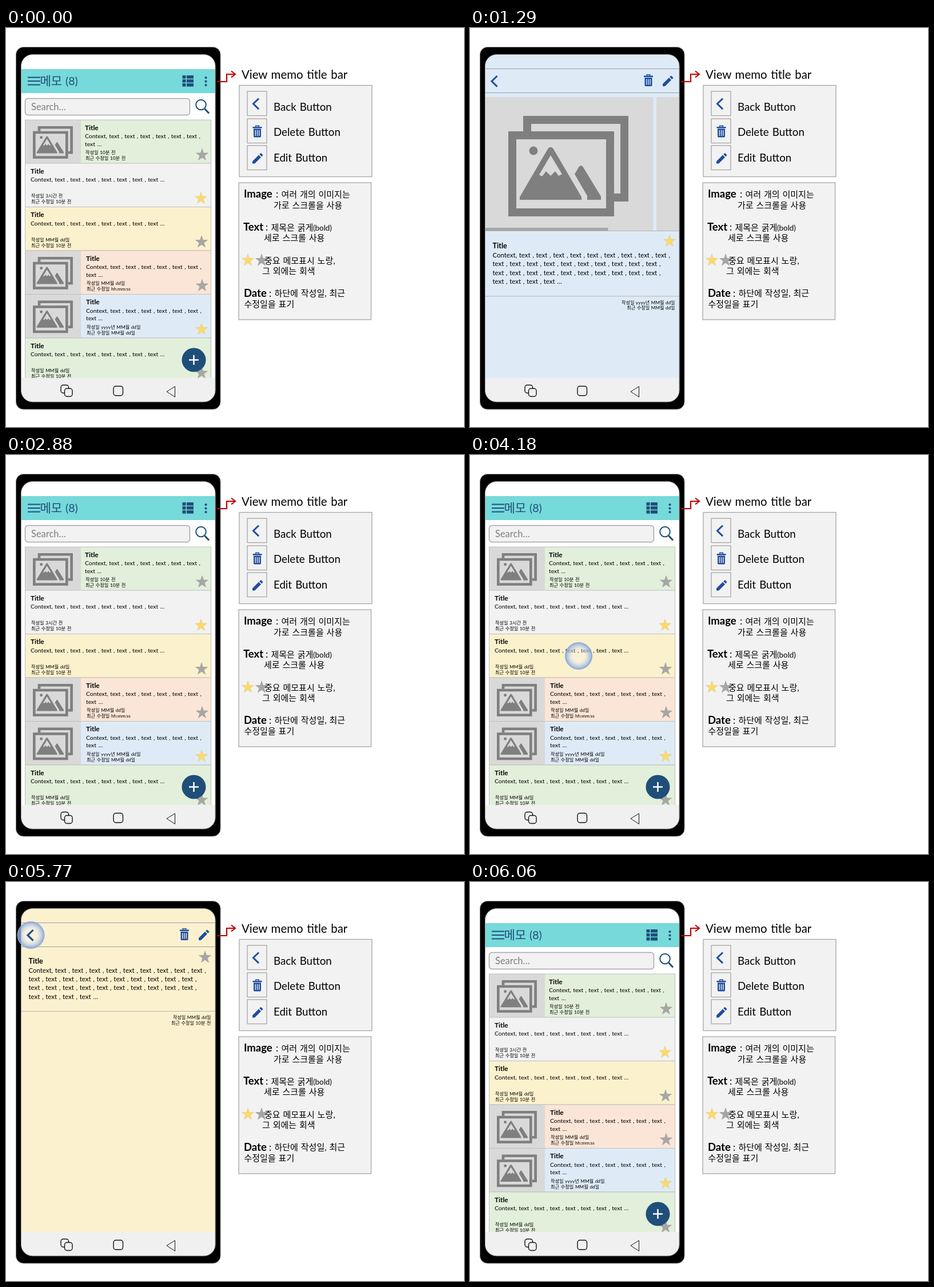
An HTML page that plays this animation: 801x699 px, repeating every 6140 ms.

```html
<!DOCTYPE html>
<html lang="ko">
<head>
<meta charset="utf-8">
<title>Memo app wireframe</title>
<style>
  html, body { margin: 0; width: 100%; height: 100%; overflow: hidden; background: #fff; }
  svg { display: block; width: 801px; height: 699px; }
  text { font-family: Lato, "Noto Sans CJK KR", "Noto Sans CJK", sans-serif; word-spacing: .07em; white-space: pre; }
  .line { fill: none; stroke: #a6a6a6; }
  .ink { fill: #1f4e79; }
  .ink-line { fill: none; stroke: #1f4e79; }
  .blue { fill: #1f4e9f; fill-rule: evenodd; }
  .panel { fill: #f2f2f2; stroke: #a6a6a6; stroke-width: 1.3; }
  .nav { fill: #f0f0f0; stroke: #111; stroke-width: 1.4; }
</style>
</head>
<body>
<svg id="stage" viewBox="0 0 801 699"></svg>
<script>
const LOOP = 6140;
const GREY = '#a6a6a6', GOLD = '#ffd966';

const text = (x, y, size, str, extra = '') =>
  `<text x="${x}" y="${y}" font-size="${size}" ${extra}>${str}</text>`;
const bold = (x, y, size, str) => text(x, y, size, str, 'font-weight="700"');
const rect = (x, y, w, h, attrs) =>
  `<rect x="${x}" y="${y}" width="${w}" height="${h}" ${attrs}/>`;
const rule = (y, color = '#9aa0a6') =>
  `<path d="M27 ${y}H366" stroke="${color}"/>`;
const use = (id, x, y, scale = '1') =>
  `<use href="#${id}" transform="translate(${x} ${y}) scale(${scale})"/>`;

function star(x, y, color) {
  const points = Array.from({ length: 10 }, (_, i) => {
    const r = i % 2 ? 4.3 : 11, a = (i / 5 - .5) * Math.PI;
    return `${(x + r * Math.cos(a)).toFixed(2)},${(y + r * Math.sin(a)).toFixed(2)}`;
  });
  const edge = color === GOLD ? '#d9c98c' : '#999';
  return `<polygon points="${points.join(' ')}" fill="${color}" stroke="${edge}" stroke-width=".6"/>`;
}

const press = (id, x, y, icon = '') =>
  `<g id="${id}"><circle cx="${x}" cy="${y}" r="23.5" fill="url(#glow)" stroke="#8faadc"/>${icon}</g>`;

const words = n => Array(n).fill('text').join(' , ');

const defs = `<defs>
  <radialGradient id="glow">
    <stop offset="0" stop-color="#fff" stop-opacity="0"/>
    <stop offset=".42" stop-color="#eef3fb" stop-opacity=".3"/>
    <stop offset=".75" stop-color="#b4c7e7" stop-opacity=".7"/>
    <stop offset="1" stop-color="#7f9fd8" stop-opacity=".9"/>
  </radialGradient>
  <clipPath id="screen">${rect(26.5, 46.5, 339.5, 608.5, 'rx="20"')}</clipPath>
  <clipPath id="page">${rect(26, 46, 340, 567, '')}</clipPath>
  <g id="pictures">
    <g fill="none" stroke="#7f7f7f" stroke-width="14">
      <path d="M33 27V7H203V143H185"/>
      <rect x="7" y="34" width="171" height="135"/>
    </g>
    <g fill="#7f7f7f">
      <circle cx="44" cy="61" r="7.5"/>
      <path fill-rule="evenodd" d="M20 147V142L69 58Q74 51 79 58L128 142V147Z
        M74 69L54 103L59 106L66 97L74 105L82 97L88 105L94 102Z"/>
      <path d="M116 102L123 90Q127 84 131 90L162 141V147H138V140Z"/>
    </g>
  </g>
  <path id="back" d="M9.5 0L0 9.3L9.5 18.6" fill="none" stroke="#1f4e9f" stroke-width="3"/>
  <path id="trash" class="blue" d="M4.5 2.5V0H11.5V2.5H16V5H0V2.5ZM6 2.5H10V1.4H6Z
    M1.5 6H14.5V19Q14.5 21 13 21H3Q1.5 21 1.5 19Z
    M4 8.5V18.5H5.4V8.5ZM7.3 8.5V18.5H8.7V8.5ZM10.6 8.5V18.5H12V8.5Z"/>
  <path id="pencil" class="blue" d="M0 18.5V14.5L11 3.5L15 7.5L4 18.5Z
    M12.2 2.3L14 .5Q14.7 0 15.4.5L18 3.1Q18.5 3.8 18 4.5L16.2 6.3Z"/>
</defs>`;

// top, colour, star x, star colour, the two date lines, text x when a picture is present
const memos = [
  [161, '#e2efda', 343, GREY, '작성일 10분 전', '최근 수정일 10분 전', 138],
  [237, '#f2f2f2', 341, GOLD, '작성일 3시간 전', '최근 수정일 10분 전'],
  [313.5, '#fbf1cc', 342, GREY, '작성일 MM월 dd일', '최근 수정일 10분 전'],
  [390, '#fbe5d6', 343, GREY, '작성일 MM월 dd일', '최근 수정일 hh:mm:ss', 140],
  [466.5, '#deebf7', 342, GOLD, '작성일 yyyy년 MM월 dd일', '최근 수정일 MM월 dd일', 140],
  [543, '#e2efda', 342, GREY, '작성일 MM월 dd일', '최근 수정일 10분 전'],
];

function memoRow([y, color, starX, starColor, made, edited, textX]) {
  const x = textX || 43;
  const picture = textX
    ? rect(34, y, 97, 76, 'fill="#d9d9d9"') + use('pictures', 47, y + 11, '.333 .323') : '';
  const body = textX
    ? text(x, y + 32, 10.4, `Context, ${words(6)} ,`) + text(x, y + 45.7, 10.4, 'text …')
    : text(x, y + 32.4, 10.4, `Context, ${words(7)} …`);
  return rect(33.5, y, 325, 76.5, `fill="${color}"`) + picture
    + rect(33.5, y, 325, 76.5, 'fill="none" stroke="#bfbfbf"')
    + bold(x, y + 17.6, 11.8, 'Title') + body
    + text(x + 1, y + 60.4, 8.2, made) + text(x + 1, y + 70, 8.2, edited)
    + star(starX, y + 61.5, starColor);
}

const listPage = `<g id="list">
  ${rect(26, 46, 340, 567, 'fill="#fff"')}
  ${rect(27, 72, 339, 42, 'fill="#76d9da"')}
  <path class="ink-line" stroke-width="2" d="M38 86.5H60M38 93H60M38 99.5H60"/>
  ${text(59.5, 100, 21, '메모', 'class="ink"')}${text(104, 100, 19.5, '(8)', 'class="ink"')}
  ${[83, 90, 97].map(y => rect(308.5, y, 6, 5.6, 'class="ink"') + rect(316, y, 12, 5.6, 'class="ink"')).join('')}
  ${[87, 93.5, 100].map(y => `<circle class="ink" cx="349.5" cy="${y}" r="2.1"/>`).join('')}
  ${rect(33.5, 123.5, 288, 29, 'rx="5" fill="#f2f2f2" stroke="#a6a6a6" stroke-width="1.5"')}
  ${text(44, 143.5, 16.5, 'Search…', 'fill="#7f7f7f"')}
  <circle class="ink-line" cx="341" cy="134.5" r="8.8" stroke-width="2"/>
  <path class="ink-line" stroke-width="3" d="M347.5 141.5L355 149.5"/>
  ${memos.map(memoRow).join('')}
  <circle cx="328.5" cy="581.5" r="21" fill="#1f4e79"/>
  <path d="M320 581.5H337M328.5 573V590" stroke="#fff" stroke-width="2.5"/>
  ${press('tapBlue', 190, 505)}${press('tapYellow', 190, 352)}
</g>`;

function detailPage(id, color, top, starX, starColor, dates, media = '') {
  const lines = [`Context, ${words(9)} ,`, `${words(10)} ,`, `${words(10)} ,`, `${words(4)} …`];
  const right = 'text-anchor="end"';
  return `<g id="${id}">
    ${rect(26, 46, 340, 567, `fill="${color}"`)}
    ${rule(71.5)}${rule(113.5)}${media}
    ${use('back', 38, 84)}${use('trash', 304, 81)}${use('pencil', 337, 83.5)}
    ${star(starX, top + (media ? 18.5 : 20.5), starColor)}
    ${bold(39.5, top + 31, 12.6, 'Title')}
    ${lines.map((s, i) => text(39.5, top + 47 + i * 15.4, 11.4, s)).join('')}
    ${rule(top + 115, '#b4b4b4')}
    ${dates.map((s, i) => text(358.5, top + 128.5 + i * 9.8, 8.1, s, right)).join('')}
  </g>`;
}

const gallery = rect(27, 121, 293.5, 234, 'fill="#d9d9d9"') + rect(326, 121, 40, 234, 'fill="#d9d9d9"')
  + use('pictures', 67, 154) + rect(27, 350, 214.5, 5, 'fill="#a6a6a6"') + rule(355.5, '#b4b4b4');

const phone = `
  ${rect(17.5, 33.5, 357.5, 634.5, 'rx="13" stroke="#7f7f7f"')}
  <g clip-path="url(#screen)">
    <g clip-path="url(#page)">
      ${listPage}
      ${detailPage('blue', '#deebf7', 355, 349, GOLD,
        ['작성일 yyyy년 MM월 dd일', '최근 수정일 MM월 dd일'], gallery)}
      ${detailPage('yellow', '#fcf1cf', 111.5, 348, GREY,
        ['작성일 MM월 dd일', '최근 수정일 10분 전'])}
    </g>
    ${rect(26, 613, 340, 43, 'fill="#f0f0f0"')}
  </g>
  ${rect(26.5, 46.5, 339.5, 608.5, 'rx="20" class="line"')}
  <g class="nav">
    ${rect(96, 625.5, 13.5, 14, 'rx="4"')}${rect(102.5, 631.5, 13.5, 14, 'rx="4"')}
    ${rect(188, 627.5, 16.5, 16.5, 'rx="4"')}
    <path stroke-width="1" d="M281 637L295.5 628V646.5Z"/>
  </g>
  ${press('tapBack', 43.5, 93, use('back', 38, 84))}`;

const notes = `
  <path d="M369 94H386V81H400M394 75.5L401 81L394 86.5" fill="none" stroke="#c00000" stroke-width="2.2"/>
  ${text(412, 89, 20.4, 'View memo title bar')}
  ${rect(408, 100.5, 232, 160, 'class="panel"')}
  ${[111, 159, 206].map(y => rect(422, y, 34, 42.5, 'class="panel"')).join('')}
  ${use('back', 432.5, 123.5)}${use('trash', 431.5, 170.5)}${use('pencil', 431, 219)}
  ${['Back', 'Delete', 'Edit'].map((s, i) => text(468, 144.5 + i * 44.7, 18.7, s + ' Button')).join('')}
  ${rect(407, 271, 231.5, 240, 'class="panel"')}
  ${bold(416, 297, 18.5, 'Image')}${text(472, 297, 17, ':')}
  ${text(481.5, 297, 15, '여러 개의 이미지는')}${text(468, 315.5, 15, '가로 스크롤을 사용')}
  ${bold(415, 355, 18.5, 'Text')}${text(454, 355, 17, ':')}
  ${text(463.5, 354.5, 15, '제목은 굵게')}${text(537, 354.5, 13.4, '(bold)')}
  ${text(451, 373, 15, '세로 스크롤 사용')}
  ${star(423, 407, GOLD)}${star(447, 407, GREY)}
  ${text(452, 412.5, 15, '중요 메모표시 노랑,')}${text(448, 431, 15, '그 외에는 회색')}
  ${bold(416, 470.5, 18.5, 'Date')}${text(460, 470.5, 17, ':')}
  ${text(469.5, 470, 15, '하단에 작성일, 최근')}${text(416.5, 489, 15, '수정일을 표기')}`;

document.getElementById('stage').innerHTML = defs + phone + notes;

// id: spans of time in ms during which the part is visible
const schedule = {
  list: [[0, 1290], [2880, 4470], [6060, LOOP]],
  tapBlue: [[960, 1290]],
  blue: [[1290, 2880]],
  tapBack: [[2590, 2880], [5770, 6060]],
  tapYellow: [[4180, 4470]],
  yellow: [[4470, 6060]],
};

for (const [id, spans] of Object.entries(schedule)) {
  const frames = [];
  const add = (ms, opacity) => frames.push({ offset: ms / LOOP, opacity, easing: 'step-end' });
  if (spans[0][0] > 0) add(0, 0);
  for (const [from, to] of spans) {
    add(from, 1);
    add(to, to < LOOP ? 0 : 1);
  }
  if (frames.at(-1).offset < 1) add(LOOP, 0);
  document.getElementById(id).animate(frames, { duration: LOOP, iterations: Infinity }).startTime = 0;
}
</script>
</body>
</html>
```
